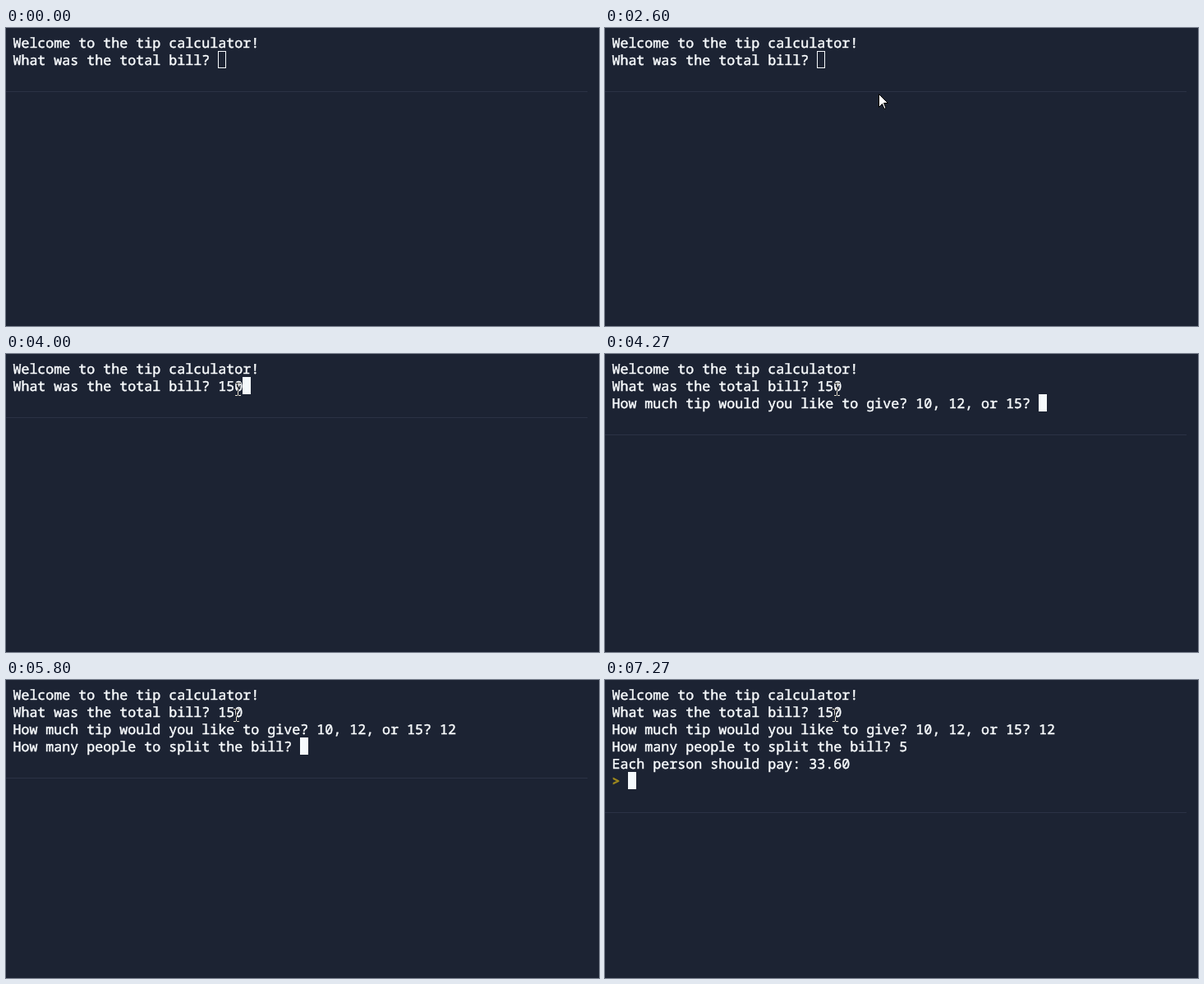
Animation, 722 px wide and 363 px high, one loop 8000 ms. Source, as an HTML page:

```html
<!DOCTYPE html>
<html lang="en">
<head>
<meta charset="utf-8">
<title>Tip calculator</title>
<style>
  html, body { margin: 0; width: 100%; height: 100%; overflow: hidden; background: #1c2333; }
  svg { display: block; }
  text {
    font: 500 16.667px "Noto Sans Mono", "DejaVu Sans Mono", monospace;
    fill: #f8fbfd;
    stroke: #f8fbfd;
    stroke-width: .45px;
    white-space: pre;
    text-rendering: geometricPrecision;
  }
  .prompt { fill: #a08a1e; stroke: #a08a1e; font-weight: bold; }
  #caret { fill: #f5f9fc; stroke: #f5f9fc; }
  #caret.idle { fill: none; }
  #arrow { fill: #fff; stroke: #000; }
  #beam { fill: #fff; mix-blend-mode: difference; }
</style>
</head>
<body>
<svg width="722" height="363" viewBox="0 0 722 363">
  <rect width="722" height="363" fill="#1c2333"/>
  <rect id="divider" width="708" height="1" fill="#2b3245"/>
  <rect id="caret" x=".5" y=".5" width="9" height="20"/>
  <g id="lines"></g>
  <path id="arrow" d="M.5 .5V16.5L4.5 12.5L7 18.5L9 17.5L6.5 11.5H11.5Z"/>
  <path id="beam" d="M-3 -8h3v1h1v-1h3v1h-3v14h3v1h-3v-1h-1v1h-3v-1h3v-14h-3z"/>
</svg>
<script>
const LOOP = 8000, CELL = 10, ROW = 21, LEFT = 8, TOP = 7;
const MOVE_START = 2200, MOVE_END = 2730, MOVE_STEP = 66.7, FOCUS = 2930;

// Terminal output: [time, appended text]
const output = [
  [0, "Welcome to the tip calculator!\nWhat was the total bill? "],
  [3270, "1"], [3670, "5"], [4000, "0"],
  [4270, "\nHow much tip would you like to give? 10, 12, or 15? "],
  [5330, "1"], [5470, "2"],
  [5800, "\nHow many people to split the bill? "],
  [6800, "5"],
  [7200, "\nEach person should pay: 33.60\n"],
  [7270, "> "]
];
// Times at which the resting pointer drifts one pixel left
const drifts = [3070, 3400, 3800, 4470, 5130];

const $ = id => document.getElementById(id);
const place = (el, x, y) => el.setAttribute("transform", `translate(${x} ${y})`);
const show = (el, on) => el.setAttribute("visibility", on ? "visible" : "hidden");
const bezier = (a, b, c, u) => Math.round((1 - u) ** 2 * a + 2 * u * (1 - u) * b + u * u * c);

const rows = Array.from({ length: 6 }, (_, i) => {
  const el = document.createElementNS("http://www.w3.org/2000/svg", "text");
  el.setAttribute("x", LEFT + 0.4);
  el.setAttribute("y", TOP + ROW * i + 16.5);
  $("lines").append(el);
  return el;
});

function drawTerminal(t) {
  const text = output.filter(([at]) => at <= t).map(([, s]) => s).join("");
  const lines = text.split("\n");
  rows.forEach((el, i) => {
    const line = lines[i] || "";
    if (el.textContent !== line) el.textContent = line;
    el.classList.toggle("prompt", line[0] === ">");
  });
  const last = lines.length - 1;
  place($("caret"), LEFT + CELL * lines[last].length, TOP + ROW * last);
  $("caret").classList.toggle("idle", t < FOCUS);
  place($("divider"), 0, TOP + ROW * lines.length + 28);
}

function drawPointer(t) {
  const elapsed = Math.floor((t - MOVE_START) / MOVE_STEP + 0.01) * MOVE_STEP;
  const u = Math.min(1, Math.max(0, elapsed / (MOVE_END - MOVE_START)));
  const x = bezier(297, 413, 285, u) - drifts.filter(at => at <= t).length;
  const y = bezier(182, 120, 43, u);
  const overText = y < 77;
  show($("arrow"), t >= MOVE_START && !overText);
  show($("beam"), t >= MOVE_START && overText);
  place($("arrow"), x, y);
  place($("beam"), x, y);
}

function frame(now) {
  const t = now % LOOP;
  drawTerminal(t);
  drawPointer(t);
  requestAnimationFrame(frame);
}
frame(0);
</script>
</body>
</html>
```
